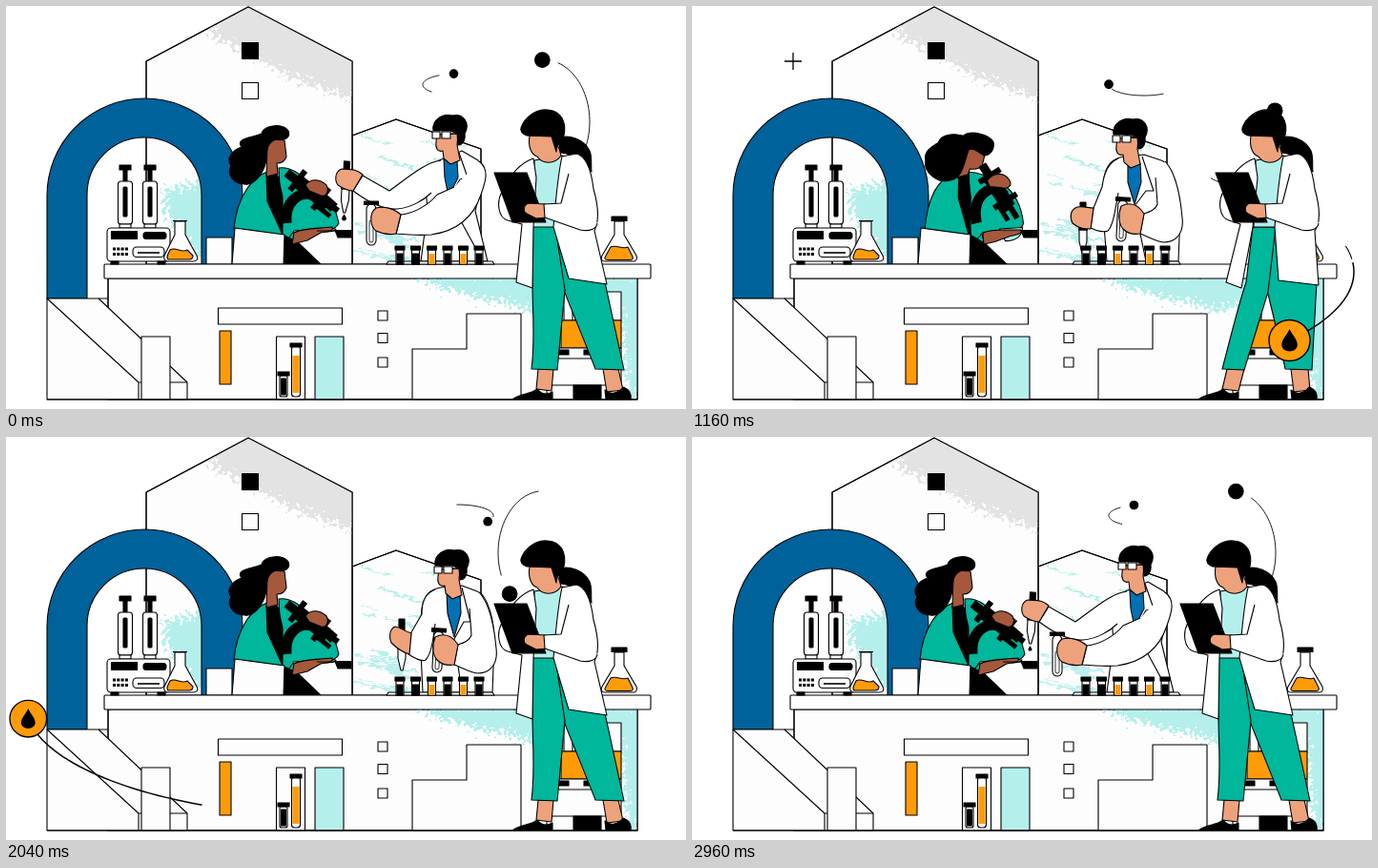
Animation, 713 px wide and 423 px high, one loop 3000 ms. Source, as an HTML page:

```html
<!DOCTYPE html>
<html lang="en">
<head>
<meta charset="utf-8">
<title>Laboratory</title>
<style>
  html, body { margin: 0; width: 100%; height: 100%; overflow: hidden; background: #fff; }
  svg { display: block; width: 713px; height: 423px; }
  .ink { stroke: #000; stroke-width: 1.1; stroke-linejoin: round; }
  .flat { stroke: none; }
  .w { fill: #fdfdfd; }
  .k { fill: #000; }
  .o { fill: #ff9b08; }
  .t { fill: #b5efec; }
  .line { fill: none; }
</style>
</head>
<body>
<svg viewBox="0 0 713 423">
  <defs>
    <filter id="rough" x="-10%" y="-10%" width="120%" height="120%">
      <feTurbulence type="fractalNoise" baseFrequency=".22" numOctaves="3" seed="4"/>
      <feDisplacementMap in="SourceGraphic" scale="34" xChannelSelector="R" yChannelSelector="G"/>
    </filter>
    <filter id="brush" x="-10%" y="-10%" width="120%" height="120%">
      <feTurbulence type="fractalNoise" baseFrequency=".12 .3" numOctaves="2" seed="9"/>
      <feDisplacementMap in="SourceGraphic" scale="9" xChannelSelector="R" yChannelSelector="G"/>
    </filter>
    <clipPath id="tallClip"><path d="M147,271 V58 L254,1 L363,58 V271 Z"/></clipPath>
    <clipPath id="lowClip"><path d="M363,271 V136 L409,119 L498,150 V271 Z"/></clipPath>
    <clipPath id="deskClip"><path d="M107,286 H662 V413 H107 Z"/></clipPath>
    <g id="syringe">
      <path class="k" d="M119,167 H131 V172 H127 V184 H123 V172 H119 Z"/>
      <rect class="w" x="117.500" y="184" width="15" height="45" rx="3"/>
      <rect class="k" x="123" y="190" width="4" height="31" rx="1"/>
      <path class="w" d="M119,229 H131 V233 H119 Z"/>
    </g>
  </defs>

  <path id="backTrail" class="ink line"/>
  <g id="backBall" class="ink"></g>

  <g class="ink">
    <path class="w" d="M363,271 V136 L409,119 L498,150 V271 Z"/>
    <g clip-path="url(#lowClip)"><g id="streaks" class="line" stroke="#b9efec" filter="url(#brush)"></g></g>
    <path class="line" d="M363,136 L409,119 L498,150 V271"/>
    <path class="w" d="M147,271 V58 L254,1 L363,58 V271 Z"/>
    <g clip-path="url(#tallClip)" class="flat">
      <path fill="#e3e3e3" filter="url(#rough)" d="M212,20 L254,-8 L385,50 V104 C345,92 330,84 305,78 C280,66 262,52 240,42 C226,38 216,34 212,20 Z"/>
      <path class="t" filter="url(#rough)" d="M164,192 C178,196 190,184 220,184 V262 H196 C188,244 176,226 168,222 Z"/>
    </g>
    <path class="line" d="M147,271 V58 L254,1 L363,58 V271"/>
    <rect class="k" x="247.500" y="38.500" width="17" height="17"/>
    <rect class="w" x="247.500" y="80.500" width="17" height="17"/>
    <path fill="#00629b" d="M43,307 V199 A102.500,102 0 0 1 248,199 V271 H205 V198 A60,60 0 0 0 85,198 V307 Z"/>
  </g>

  <g id="seated" class="ink"></g>
  <g id="man" class="ink"></g>

  <g class="ink">
    <rect class="w" x="210" y="243" width="27" height="28"/>
    <path class="w" d="M240,233 L292,240 L291,271 H237 Z"/>
    <path class="w" d="M107,286 H662 V413 H107 Z"/>
    <g clip-path="url(#deskClip)">
      <path class="t flat" filter="url(#rough)" d="M425,280 H680 V412 H655 C646,380 652,330 636,308 C600,306 566,322 545,318 C520,308 500,310 480,302 C460,296 446,294 425,280 Z"/>
    </g>
    <path class="line" d="M107,286 V413 H662 V286"/>
    <rect class="w" x="103" y="271" width="573" height="15" rx="1"/>

    <path class="w" d="M43,307 H97 L190,395 V413 H43 Z"/>
    <path class="line" d="M43,307 L139,395 V413 M139,395 H190 M97,307 H107"/>
    <rect class="w" x="142" y="347" width="30" height="66"/>

    <rect class="w" x="222.500" y="317" width="130" height="17"/>
    <rect class="o" x="224" y="341" width="12" height="56"/>
    <rect class="w" x="283.500" y="347" width="30" height="66"/>
    <rect class="w" x="287" y="388" width="8" height="22" rx="2"/>
    <path class="k" d="M285,384 H297 V388 H285 Z M288.500,391 H293.500 V408 H288.500 Z"/>
    <rect class="w" x="299.500" y="357" width="9" height="53" rx="3"/>
    <path class="k" d="M298,354 H310 V358 H298 Z"/>
    <rect class="o flat" x="300.500" y="367" width="7" height="39"/>
    <rect class="t" x="324" y="347" width="30" height="66"/>
    <path class="w" d="M390,320 h10 v10 h-10 Z M390,343.500 h10 v10 h-10 Z M390,369 h10 v10 h-10 Z"/>
    <path class="w" d="M426,413 V360 H483 V323 H540 V413 Z"/>

    <rect class="w" x="585" y="300" width="60" height="30"/>
    <path class="line" d="M594,300 V330 M597,300 V330"/>
    <rect class="o" x="582" y="330" width="63" height="29"/>
    <rect class="w" x="567" y="359" width="78" height="54"/>
    <path class="k" d="M577,361 H590 V366 H577 Z M606,361 H622 V366 H606 Z M595,398 H624 V413 H595 Z"/>
    <path class="line" d="M567,370 H645 M567,398 H645"/>

    <use href="#syringe"/><use href="#syringe" x="26"/>
    <rect class="w" x="106" y="233" width="66" height="35" rx="4"/>
    <rect class="k" x="110.500" y="236.500" width="27" height="8"/>
    <rect class="k" x="144" y="237.500" width="24" height="7" rx="3"/>
    <path class="line" d="M112,255 H128 M112,260.500 H128" stroke-width="3" stroke-dasharray="3 1.300"/>
    <rect class="w" x="133" y="253" width="33" height="10.500" rx="4"/>
    <path class="line" d="M138,259 H161" stroke-width="1.600"/>
    <path class="k" d="M110,268 H118 V271 H110 Z M159,268 H167 V271 H159 Z"/>

    <path class="w" d="M177,226 V240 L166,262 C165,266 167,268 170,268 H196 C200,268 202,266 200,262 L188,240 V226 Z"/>
    <path class="line" d="M175,225.500 H190"/>
    <path class="o" d="M172,256 C178,252 184,260 190,256 L196,262 C196,265 194,266 192,266 H170 C168,264 169,262 172,256 Z"/>
    <path class="w" d="M638,226 V240 L625,262 C623,266 625,268 628,268 H658 C661,268 662,265 661,262 L648,240 V226 Z"/>
    <rect class="k" x="635" y="221" width="16" height="4.500"/>
    <path class="o" d="M634,253 C640,250 646,256 652,253 L657,263 C658,266 656,266.500 654,266.500 H631 C628,266.500 627,265 629,262 Z"/>

    <path class="w" d="M401,268 H510 L512,271 H399 Z"/>
    <g id="rack"></g>
    <path class="line" d="M43,413 H662"/>
  </g>

  <g id="atoms" class="ink"></g>
  <g id="standing" class="ink"></g>
  <g id="sparks" class="ink line"></g>
  <path id="frontTrail" class="ink line" style="stroke-width:1.500"/>
  <g id="frontBall" class="ink"></g>
</svg>

<script>
const LOOP = 3000, STEP = 40;
const $ = id => document.getElementById(id);
const TEAL = '#00b69b', SKIN = '#eda27c', BROWN = '#a5583c', WHITE = '#fff', BLACK = '#000';

function mk(tag, attrs, parent) {
  const el = document.createElementNS('http://www.w3.org/2000/svg', tag);
  for (const k in attrs) el.setAttribute(k, attrs[k]);
  return parent.appendChild(el);
}
const set = (el, k, v) => el.setAttribute(k, v);
const rad = deg => deg * Math.PI / 180;
const mod = t => ((t % LOOP) + LOOP) % LOOP;
const ease = p => p < .5 ? 4 * p ** 3 : 1 - (2 - 2 * p) ** 3 / 2;
const ramp = (t, a, b) => ease(Math.min(1, Math.max(0, (t - a) / (b - a))));
const place = (x, y, r = 0, s = 1) => `translate(${x} ${y}) rotate(${r}) scale(${s})`;

// A part is a path with a base pose and further poses that are mixed in by weight.
const NUM = /\d+(\.\d+)?/g;
function part(parent, fill, base, ...poses) {
  const el = mk('path', { fill, d: base }, parent);
  const all = poses.map(p => p.match(NUM).map(Number));
  el.pose = (...weights) => {
    let i = 0;
    set(el, 'd', base.replace(NUM, n => {
      const v = all.reduce((sum, p, j) => sum + (p[i] - n) * (weights[j] || 0), +n);
      i++;
      return v.toFixed(2);
    }));
  };
  return el;
}

// Static details
let seed = 7;
const rnd = () => (seed = seed * 16807 % 2147483647) / 2147483647;
for (let i = 0; i < 46; i++) {
  const low = i > 32, x = 362 + rnd() * (low ? 45 : 105), y = low ? 222 + rnd() * 45 : 136 + rnd() * 100;
  const len = 14 + rnd() * 32;
  mk('path', { d: `M${x},${y} l${len},${len * .26}`, 'stroke-width': 1 + rnd() * 2.2 }, $('streaks'));
}
[413, 429.5, 446.5, 463, 479.5, 496].forEach((x, i) => {
  const g = mk('g', { transform: place(x, 252) }, $('rack'));
  mk('rect', { x: -4, y: 4, width: 8, height: 15, fill: WHITE }, g);
  mk('rect', { x: -3, y: 8, width: 6, height: 11, class: i == 2 || i == 4 ? 'o flat' : 'k' }, g);
  mk('rect', { x: -5, y: 0, width: 10, height: 4, class: 'k' }, g);
});

// Seated woman with microscope: looking up, then looking in
const seated = $('seated');
const sit = [
  part(seated, TEAL, 'M274,174 C258,180 242,200 239,234 L291,240 L292,258 L306,252 L290,200 Z',
    'M276,176 C256,182 248,205 246,234 L291,240 L292,256 L308,252 L294,200 Z'),
  part(seated, TEAL, 'M286,170 C298,168 308,176 318,186 C334,190 344,206 349,228 C346,234 340,236 330,234 L302,236 L290,252 L288,210 Z',
    'M292,176 C304,176 318,184 330,188 C342,200 346,212 347,228 C346,234 340,238 330,236 L306,238 L294,252 L292,210 Z'),
  part(seated, BLACK, 'M273,177 L284,174 L290,200 L290,240 L306,248 L330,271 L291,271 L290,240 L274,205 Z',
    'M282,177 L291,176 L293,200 L292,240 L308,250 L330,271 L291,271 L290,240 L281,200 Z'),
  part(seated, BROWN, 'M274,143 C278,138 286,140 292,141 L294,158 C292,164 288,165 284,165 L285,176 L273,179 Z',
    'M290,148 C300,144 308,152 312,162 L308,170 C304,174 298,174 294,173 L291,177 L281,180 Z'),
  part(seated, BLACK, 'M268,134 C270,124 292,123 296,131 C299,139 291,142 283,140 C275,143 273,150 273,160 C272,172 262,189 250,187 C238,187 231,176 236,168 C230,160 238,151 247,148 C240,139 258,138 268,134 Z',
    'M290,137 C300,132 318,138 323,147 C324,155 320,162 314,163 C308,156 302,148 296,148 C290,160 292,180 276,182 C262,186 246,172 248,160 C247,150 256,146 262,142 C268,132 282,132 290,137 Z'),
  part(seated, '#b5efec', 'M330,234 L346,234 C345,236 340,237 336,237 Z', 'M320,234 L347,232 C346,245 338,250 326,250 Z'),
  part(seated, 'none', 'M294,228 C292,206 306,194 322,198 C330,200 338,206 344,212', 'M300,228 C296,214 296,200 310,190 C314,188 318,190 322,194'),
];
set(sit[6], 'stroke-width', 11);
const scope = mk('g', {}, seated);
mk('path', { d: 'M-4,-32 H4 V-21 H13 V-16 H7 V10 H14 V15 H7 V20 H4 V34 H-1 V22 H-6 V31 H-10 V15 H-13 V10 H-7 V-16 H-12 V-21 H-4 Z', class: 'k' }, scope);
sit.push(
  part(seated, BROWN, 'M314,188 C320,180 330,182 336,188 C340,196 334,202 328,198 L318,194 Z',
    'M308,182 C314,172 326,172 331,180 C336,186 330,190 322,188 L310,188 Z'),
  part(seated, BROWN, 'M302,238 C314,232 328,234 342,232 C344,237 336,237 330,238 L316,246 L300,250 Z',
    'M306,238 C316,234 330,236 346,236 C348,240 340,242 334,243 L318,248 L308,250 Z'));
mk('path', { d: 'M345,235.500 H362 V243 H348 Z', class: 'k' }, seated);
const stageLine = mk('path', { d: 'M326,236 H362', class: 'line' }, seated);

// Man: arms in, arms out, dipping
const man = $('man');
const stand = [
  part(man, WHITE, 'M456,158 C444,160 438,166 436,180 L434,205 L437,268 L510,268 L512,215 C512,190 504,165 494,162 L478,156 Z',
    'M460,160 C450,162 442,170 440,190 L442,215 L435,268 L505,268 L492,215 C498,190 502,175 495,162 L478,152 Z',
    'M453,158 C441,160 435,166 432,180 L430,205 L435,268 L510,268 L512,215 C511,190 503,165 492,162 L474,156 Z'),
  part(man, '#0071b4', 'M462,163 L476,164 L477,185 L470,210 L463,185 Z',
    'M459,161 L473,163 L474,180 L464,200 L460,180 Z', 'M457,163 L470,165 L471,185 L464,208 L457,185 Z'),
  part(man, 'none', 'M478,158 L487,194 L480,194 L470,212 L478,268', 'M475,154 L484,180 L476,182 L464,202 L500,268',
    'M472,158 L484,194 L476,194 L464,210 L476,268'),
  part(man, WHITE, 'M450,160 C440,164 436,172 436,186 L425,205 L422,228 C428,232 436,236 440,234 C446,228 448,212 450,196',
    'M456,162 C440,164 424,178 402,194 L374,178 L364,194 C380,206 396,214 410,213 C424,212 438,204 446,196',
    'M447,160 C437,164 432,174 430,190 L421,212 L418,233 C424,236 432,238 436,236 C442,230 444,212 447,196'),
];
const head = mk('g', {}, man);
mk('path', { fill: SKIN, d: 'M452,135 L474,134 L473,146 L476,162 L466,166 L459,160 L458,152 C452,154 450,148 451,142 Z' }, head);
mk('path', { class: 'k', d: 'M448,131 C446,120 458,112 468,115 C480,112 487,124 481,134 C482,142 478,146 474,146 L473,134 L466,131 Z' }, head);
mk('path', { fill: WHITE, d: 'M447,132 H455 V139 H447 Z M457,132 H466 V139 H457 Z M466,134 H476' }, head);
const pipette = mk('g', {}, man);
mk('path', { class: 'w', d: 'M-4,0 H4 V12 L1,25 H-1 L-4,12 Z' }, pipette);
mk('path', { class: 'k', d: 'M-3,-29 H3 V-10 L4.500,0 H-4.500 L-3,-10 Z' }, pipette);
stand.push(part(man, SKIN, 'M425,206 C418,204 414,200 408,199 C401,202 402,212 404,216 C410,222 416,226 423,228 Z',
  'M374,177 C366,170 360,172 352,171 C344,174 345,184 348,188 C354,192 358,194 364,194 Z',
  'M421,212 C416,212 410,210 404,211 C396,214 396,222 399,228 C406,234 412,234 418,234 Z'),
  part(man, WHITE, 'M496,163 C508,176 512,200 514,222 C516,238 508,248 494,248 C484,246 478,242 470,239 L474,218 C480,216 486,214 488,208 L486,180',
    'M496,163 C508,172 502,186 498,198 C490,222 474,236 446,240 C432,241 420,240 409,239 L414,219 C428,218 444,208 452,198 L470,190'));
const tube = mk('g', {}, man);
mk('rect', { x: -5, y: 1, width: 10, height: 43, rx: 5, fill: WHITE }, tube);
mk('rect', { x: -2, y: 18, width: 4, height: 23, rx: 2, fill: 'none', 'stroke-width': .8 }, tube);
mk('rect', { x: -7.5, y: -2, width: 15, height: 3.5, class: 'k' }, tube);
stand.push(part(man, SKIN, 'M474,218 C466,206 458,206 450,210 C446,220 448,230 452,234 C458,240 464,240 470,239 Z',
  'M414,219 C406,212 396,210 388,212 C380,218 382,232 388,236 C396,240 404,240 409,239 Z'));
const DROP = 'M0,-13 C3,-6 9,-1 9,5 C9,15 -9,15 -9,5 C-9,-1 -3,-6 0,-13 Z';
const drip = mk('path', { d: DROP, class: 'k' }, man);

// Standing woman: leaning left, leaning right
const standing = $('standing');
const lean = [
  part(standing, SKIN, 'M558,381 L574,381 L572,404 L556,402 Z', 'M561,381 L579,381 L573,404 L556,402 Z'),
  part(standing, SKIN, 'M626,381 L642,381 L647,403 L630,405 Z', 'M628,381 L646,381 L648,403 L631,405 Z'),
  part(standing, TEAL, 'M556,232 L577,230 L628,290 L648,382 L618,381 C606,350 585,300 566,250 Z',
    'M592,232 L614,232 L655,290 L650,382 L622,381 C616,350 606,310 596,270 Z'),
  part(standing, TEAL, 'M552,230 L576,232 L586,298 L578,382 L551,381 C555,350 552,320 552,292 Z',
    'M588,232 L612,232 L604,300 L579,382 L556,381 C564,350 574,310 581,290 Z'),
];
mk('path', { class: 'k', d: 'M531,413 C540,406 550,408 557,402 C562,408 568,408 573,405 V413 Z M629,413 L628,403 C634,409 642,406 647,400 C654,402 656,408 655,413 Z' }, standing);
const under = mk('g', {}, standing);
mk('path', { class: 'k', d: 'M578,139 C590,134 606,140 612,152 C615,160 613,168 614,174 C606,166 598,156 582,154 Z' }, under);
mk('path', { class: 't', d: 'M554,162 L584,157 L579,232 H552 Z' }, under);
lean.push(
  part(standing, WHITE, 'M553,160 C538,165 528,178 520,195 C514,206 516,222 526,225 L541,229 L535,290 L552,296 L553,232 L556,180 Z',
    'M590,160 C575,165 565,178 557,195 C551,206 553,222 563,225 L575,229 L560,290 L576,296 L588,232 L593,180 Z'),
  part(standing, WHITE, 'M583,158 L598,155 C610,158 614,175 616,192 C620,206 622,220 619,230 L617,236 L630,292 L590,286 L574,232 C576,210 578,180 583,158 Z',
    'M620,158 L635,155 C647,158 651,175 653,192 C657,206 659,220 656,230 L653,236 L657,293 L615,288 L611,232 C613,210 615,180 620,158 Z'));
const upper = mk('g', {}, standing);
mk('path', { class: 'k', d: 'M512,175 H546 L566,227 H531 Z' }, upper);
mk('path', { fill: SKIN, d: 'M566,208 L548,207 C542,209 542,216 546,218 L556,223 L566,222 Z' }, upper);
mk('path', { fill: WHITE, d: 'M590,176 L582,207 L564,208 L565,222 L602,235 C612,237 619,234 620,228' }, upper);
mk('path', { fill: SKIN, d: 'M549,136 H574 C576,144 580,146 582,157 C575,167 562,166 557,158 C551,156 547,148 549,136 Z' }, upper);
mk('path', { class: 'k', d: 'M540,128 C544,116 556,108 568,109 C582,110 588,122 585,136 C580,142 577,146 577,153 L572,137 L546,136 C541,134 539,132 540,128 Z' }, upper);

// Orbits
const balls = ['backBall', 'frontBall'].map(id => {
  mk('circle', { r: 23.5, class: 'o', 'stroke-width': 1.6 }, $(id));
  mk('path', { d: DROP, class: 'k flat' }, $(id));
  return $(id);
});
const KEYS = [[-960, -188], [-360, -122], [440, -50], [840, -8], [1480, 85], [2040, 172], [2640, 238], [3440, 310], [3840, 352]];
function ballAngle(t) {
  let i = 1;
  while (t >= KEYS[i + 1][0]) i++;
  const [a, b, c, d] = KEYS.slice(i - 1, i + 3), w = c[0] - b[0], p = (t - b[0]) / w;
  const m = (c[1] - a[1]) / (c[0] - a[0]) * w, n = (d[1] - b[1]) / (d[0] - b[0]) * w;
  return b[1] + (c[1] - b[1]) * p * p * (3 - 2 * p) + m * p * (1 - p) ** 2 - n * p * p * (1 - p);
}
const onEllipse = (cx, cy, a, b) => deg => [cx + a * Math.cos(rad(deg)), cy + b * Math.sin(rad(deg))];
const ballPos = onEllipse(357, 279, 337, 120);

function curve(pos, from, to, keep = () => true) {
  let d = '', pen = false;
  for (let i = 0; i <= 30; i++) {
    const deg = from + (to - from) * i / 30, on = keep(deg);
    if (on) d += (pen ? 'L' : 'M') + pos(deg).map(v => v.toFixed(2));
    pen = on;
  }
  return d;
}

function atom(pos, r, start, dir, gap) {
  const tail = mk('path', { class: 'line', 'stroke-width': .9 }, $('atoms'));
  const dot = mk('circle', { r, class: 'k' }, $('atoms'));
  return t => {
    const deg = start + dir * .24 * t, [x, y] = pos(deg);
    set(dot, 'cx', x); set(dot, 'cy', y);
    set(tail, 'd', curve(pos, deg - dir * 125, deg - dir * gap));
  };
}
const atoms = [
  atom(onEllipse(474, 82.5, 37, 11.5), 4.3, -97, 1, 25),
  atom(onEllipse(564, 121.5, 48, 65), 7.8, -92, -1, 20),
];

const sparks = [[388, 87, 230], [106, 58, 970], [631, 206, 2280]].map(([x, y, start]) => {
  const el = mk('path', { transform: place(x, y), 'stroke-width': 1.3 }, $('sparks'));
  return t => {
    const p = (t - start) / 600, live = p > 0 && p < 1;
    const far = 17 * (1 - (1 - p) ** 2), near = Math.max(0, 17 * (p - .35) / .65);
    set(el, 'd', live ? [[1, 0], [-1, 0], [0, 1], [0, -1]]
      .map(([u, v]) => `M${u * near},${v * near}L${u * far},${v * far}`).join('') : '');
  };
});

function draw(t) {
  const down = ramp(t, 60, 400) - ramp(t, 1000, 1400);
  sit.forEach(s => s.pose(down));
  set(scope, 'transform', place(320 + 2 * down, 195 - down, -52 + 27 * down));
  set(stageLine, 'opacity', 1 - down);

  const out = 1 - ramp(t, 60, 420) + ramp(t, 2440, 2920);
  const dip = ramp(t, 480, 800) - ramp(t, 1640, 2040);
  stand.forEach(s => s.pose(out, dip));
  const sway = 6 * Math.sin(Math.PI * out);
  set(head, 'transform', place(2 * (1 - out) + sway - 8 * dip, 4 * (1 - out)));
  set(pipette, 'transform', place(415 - 59 * out - 5 * dip, 220 - 28 * out + 15 * dip, 3 * out + sway));
  set(tube, 'transform', place(454 - 71 * out - 2 * dip, 203 + 4 * out, 3 * (1 - out)));

  const age = t > 1500 ? t - LOOP : t, fall = Math.max(0, age - 60);
  set(drip, 'visibility', age > -80 && age < 180 ? 'visible' : 'hidden');
  set(drip, 'transform', place(354.5, 222 + fall * fall / 1000, 0, Math.min(.34, .26 + age / 700)));

  const right = ramp(t, 460, 820) - ramp(t, 1600, 2000);
  lean.forEach(s => s.pose(right));
  for (const g of [under, upper]) set(g, 'transform', place(37 * right, 0));

  const deg = ballAngle(t), [x, y] = ballPos(deg);
  const from = t < 360 ? ballAngle(t + LOOP - 360) - 360 : ballAngle(t - 360);
  const front = a => Math.sin(rad(a)) > -.1;
  set($('backTrail'), 'd', curve(ballPos, from, deg, a => !front(a)));
  set($('frontTrail'), 'd', curve(ballPos, from, deg, front));
  const near = Math.sin(rad(deg)) > -.3;
  balls.forEach((b, i) => {
    set(b, 'visibility', near == !!i ? 'visible' : 'hidden');
    set(b, 'transform', place(x, y, 0, (19 + 5 * Math.sin(rad(deg))) / 24));
  });

  atoms.forEach(f => f(t));
  sparks.forEach(f => f(t));
}

function tick() {
  draw(Math.floor(mod(performance.now()) / STEP) * STEP);
  requestAnimationFrame(tick);
}
tick();
</script>
</body>
</html>
```
